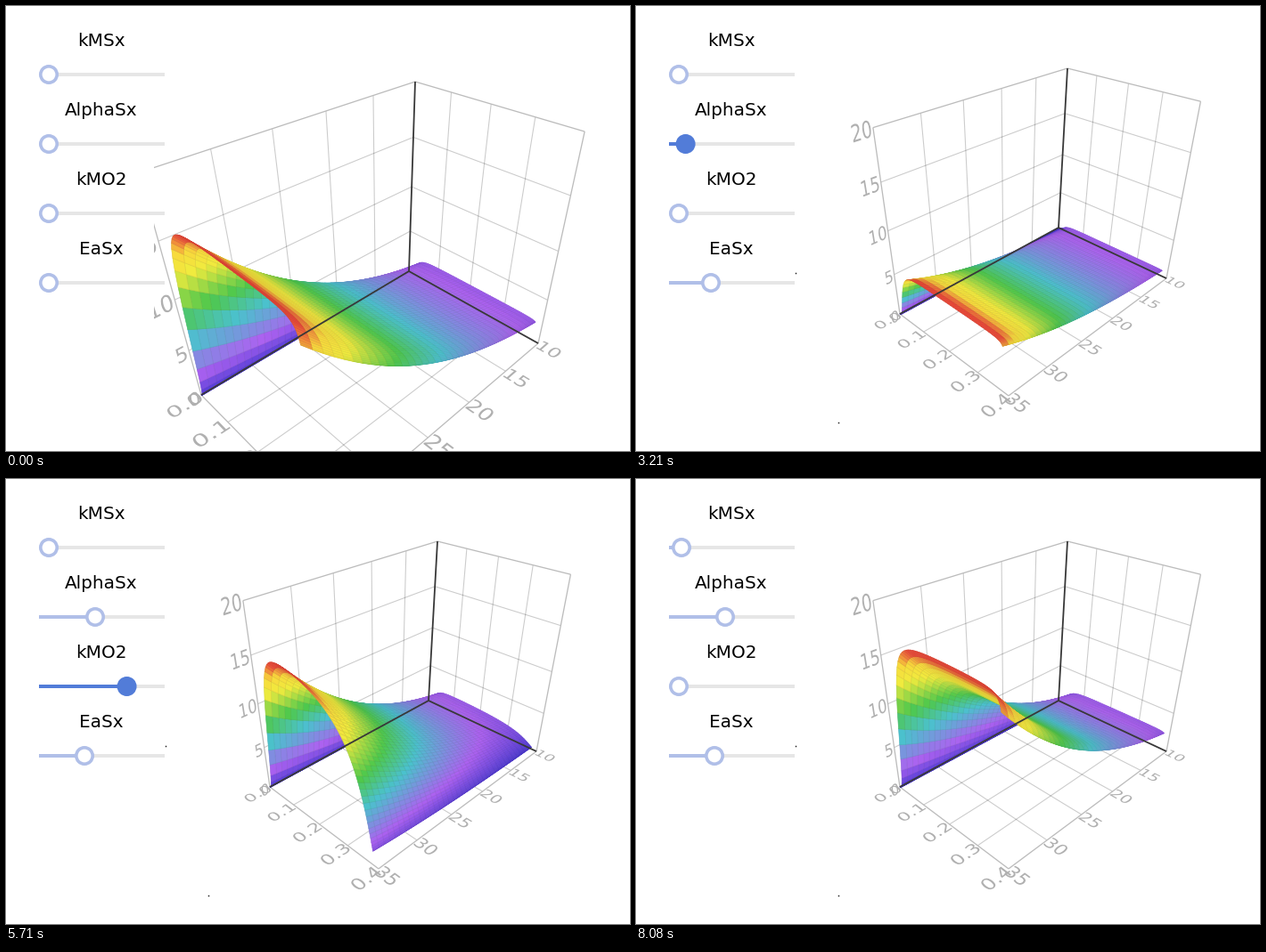
A matplotlib script for the animation above (8330 ms loop, 700x500 px).

```python
import numpy as np
import matplotlib.pyplot as plt
from matplotlib.animation import FuncAnimation
from matplotlib.collections import LineCollection, PolyCollection
from matplotlib.colors import LinearSegmentedColormap
from matplotlib.patches import Circle, PathPatch, Rectangle
from matplotlib.path import Path
from matplotlib.textpath import TextPath

W, H, DPI = 700, 500, 100
FRAMES, STEP = 238, 35
PX = 72 / DPI
SCENE_LEFT = 166

fig = plt.figure(figsize=(W / DPI, H / DPI), dpi=DPI, facecolor="white")
ax = fig.add_axes([0, 0, 1, 1])
ax.set(xlim=(0, W), ylim=(H, 0))
ax.axis("off")
scene_clip = Rectangle((SCENE_LEFT, 0), W - SCENE_LEFT, H, transform=ax.transData)


def ease(t, start, end):
    u = np.clip((t - start) / (end - start), 0, 1)
    return u * u * (3 - 2 * u)


# --- camera: homogeneous rows for origin, moisture, temperature and rate axes
def pose(origin, *ends):
    o = np.array([*origin, 1.0])
    return np.array([o] + [np.array([x, y, 1]) * w - o for x, y, w in ends])


NEAR = pose((452, 298), (597, 379, 0.849), (219, 437, 0.772), (459, 85, 0.804))
FAR = pose((474, 249), (595, 306, 0.871), (296, 346, 0.805), (484, 70, 0.843))


def camera(t):
    p = ease(t, 40, 1340)
    bump = np.sin(np.pi * np.clip((t - 40) / 760, 0, 1)) ** 2
    s, cx, cy = 1 + 0.1 * bump, 430, 330
    zoom = np.array([[s, 0, 0], [0, s, 0],
                     [cx * (1 - s), cy * (1 - s) - 12 * bump, 1]])
    return ((1 - p) * NEAR + p * FAR) @ zoom


def project(m, pts):
    h = m[0] + np.asarray(pts) @ m[1:]
    return h[..., :2] / h[..., 2:], h[..., 2]


# --- slider drags: start ms, end ms, knob x reached
KNOB_MIN = 48
DRAGS = {
    "kMSx": [(6200, 6570, 161), (6920, 7260, 51)],
    "AlphaSx": [(3152, 3417, 128), (3500, 3820, 116),
                (3860, 4150, 128), (4200, 4340, 100)],
    "kMO2": [(5280, 5877, 153), (7300, 7960, 48)],
    "EaSx": [(1880, 2950, 84), (4380, 4530, 103), (4700, 5040, 88)],
}
REST = ("AlphaSx", 1200, 1700)  # pointer rests on this knob


def knob_x(name, t):
    x = KNOB_MIN
    for start, end, to in DRAGS[name]:
        x += (to - x) * ease(t, start, end)
    return x


def knob_state(name, t):
    if any(a - 20 <= t < b + 90 for a, b, _ in DRAGS[name]):
        return "drag"
    near = any(a - 120 <= t < a for a, _, _ in DRAGS[name])
    resting = name == REST[0] and REST[1] <= t < REST[2]
    return "hover" if near or resting else "idle"


# --- Dual Arrhenius and Michaelis-Menten rate on a moisture/temperature grid
NM, NT = 70, 36
theta = 0.383 * (1 - np.cos(np.pi * np.linspace(0, 1, NM + 1))) / 2
temp = np.linspace(10, 35, NT + 1)
TH, TC = np.meshgrid(theta, temp, indexing="ij")
warm = np.exp(-6976 * (1 / (TC + 273.15) - 1 / 308.15))
o2 = 0.349 * (0.3933 - TH) ** (4 / 3)


def rate(t):
    ks, al, ko, ea = (knob_x(name, t) for name in DRAGS)
    km_s = 1.5e-5 + 8.2e-6 * (ks - KNOB_MIN)
    km_o = 9e-5 + 8.5e-5 * (ko - KNOB_MIN)
    vmax = 17.5 * (al - 38) / 62 * np.exp(-0.0455 * (ea - 88))
    return vmax * warm * TH**3 / (km_s + TH**3) * o2 / (km_o + o2)


rainbow = LinearSegmentedColormap.from_list("rate", [
    (0, "#4838d4"), (0.16, "#ac62f0"), (0.38, "#4bc1cd"), (0.54, "#4ec84c"),
    (0.74, "#f0eb3e"), (0.85, "#f8d83c"), (0.95, "#ea4a38"), (1, "#ea4637")])


def quads(g):
    q = np.stack([g[:-1, :-1], g[1:, :-1], g[1:, 1:], g[:-1, 1:]], axis=2)
    return q.reshape(-1, 4, *g.shape[2:])


# --- grid, main axes and labels in unit-box coordinates
def rule(axis, pos, along):
    start = pos * np.eye(3)[axis]
    return [start, start + np.eye(3)[along]]


grid, outer = [], []
for axis, n in enumerate((4, 5, 4)):
    for along in {0, 1, 2} - {axis}:
        grid += [rule(axis, i / n, along) for i in range(1, n)]
        outer.append(rule(axis, 1, along))
main = [rule(0, 0, along) for along in range(3)]


def glyphs(text, place):
    path = TextPath((0, 0), text, size=1, prop={"family": "DejaVu Sans"})
    x, y = path.vertices.T
    width = sum(0.318 if ch == "." else 0.636 for ch in text)
    cols = np.broadcast_arrays(*place(x, y - 0.365, width))
    return np.stack(cols, axis=-1).astype(float), path.codes


# Labels lie flat in the floor or the left wall, so they share its perspective.
parts = []
for k in np.linspace(0, 1, 5):
    parts.append(glyphs(f"{0.4 * k:.1f}", lambda x, y, w:
                        (k - 0.11 * y, 1 + 0.076 * (w - x), 0)))
    parts.append(glyphs(f"{20 * k:.0f}", lambda x, y, w:
                        (0, 1.005 + 0.063 * (w - x), k + 0.1 * y)))
for k in np.linspace(0, 1, 6):
    parts.append(glyphs(f"{10 + 25 * k:.0f}", lambda x, y, w:
                        (1 + 0.11 * x, k - 0.074 * y, 0)))
label_pts, label_codes = map(np.concatenate, zip(*parts))

grid_art = LineCollection([], colors="black", alpha=0.2, linewidths=1.1 * PX)
outer_art = LineCollection([], colors="#bcbcbc", linewidths=1.3 * PX)
label_art = PathPatch(Path([(0, 0)]), facecolor="#b0b0b0", lw=0)
surface = PolyCollection([], linewidths=0.6 * PX)
main_art = LineCollection([], colors="#383838", linewidths=1.8 * PX)
for z, art in enumerate((grid_art, outer_art, label_art, surface, main_art)):
    art.set_zorder(z + 1)
    ax.add_artist(art)
    art.set_clip_path(scene_clip)
specks, = ax.plot([178.5, 227], [299.5, 467.5], ls="", marker="s", ms=1.5 * PX,
                  mew=0, color="#222222", zorder=6)

# --- slider panel
IDLE, ACTIVE = "#b0bfe8", "#527cd8"
TRACK = dict(solid_capstyle="butt", lw=4 * PX)
widgets = {}
for i, name in enumerate(DRAGS):
    y = 77 + 78 * i
    ax.text(107, y - 32, name, ha="center", va="baseline", color="black",
            fontsize=20 * PX, family="DejaVu Sans", zorder=7)
    ax.plot([KNOB_MIN, 178], [y, y], color="#e6e6e6", zorder=7, **TRACK)
    fill, = ax.plot([], [], zorder=8, **TRACK)
    knob = ax.add_patch(Circle((KNOB_MIN, y), 9.2, lw=3.6 * PX, zorder=9))
    widgets[name] = fill, knob, y


def draw_sliders(t):
    for name, (fill, knob, y) in widgets.items():
        x, state = knob_x(name, t), knob_state(name, t)
        color = IDLE if state == "idle" else ACTIVE
        fill.set_data([37 if x > KNOB_MIN + 0.5 else x, x], [y, y])
        fill.set_color(color)
        knob.center = x, y
        knob.set_edgecolor(color)
        knob.set_facecolor(ACTIVE if state == "drag" else "white")


def draw_box(m):
    for art, lines in ((grid_art, grid), (outer_art, outer), (main_art, main)):
        art.set_segments(project(m, lines)[0])
    label_art.set_path(Path(project(m, label_pts)[0], label_codes))


def draw_surface(m, t):
    r = rate(t)
    xy, w = project(m, np.stack([TH / 0.4, (TC - 10) / 25, r / 20], axis=-1))
    order = np.argsort(-quads(w).mean(axis=1))  # far cells first
    face = rainbow(quads(r / r.max()).mean(axis=1))[order, :3]
    surface.set_verts(quads(xy)[order])
    surface.set_facecolor(face)
    surface.set_edgecolor(face * 0.92)


def update(i):
    t = (i + 0.5) * STEP if i else 0
    m = camera(t)
    draw_box(m)
    draw_surface(m, t)
    draw_sliders(t)
    specks.set_visible(t > 880)
    return []


anim = FuncAnimation(fig, update, frames=FRAMES, interval=STEP,
                     init_func=lambda: update(0), repeat=True, repeat_delay=0,
                     blit=False)
plt.show()
```
